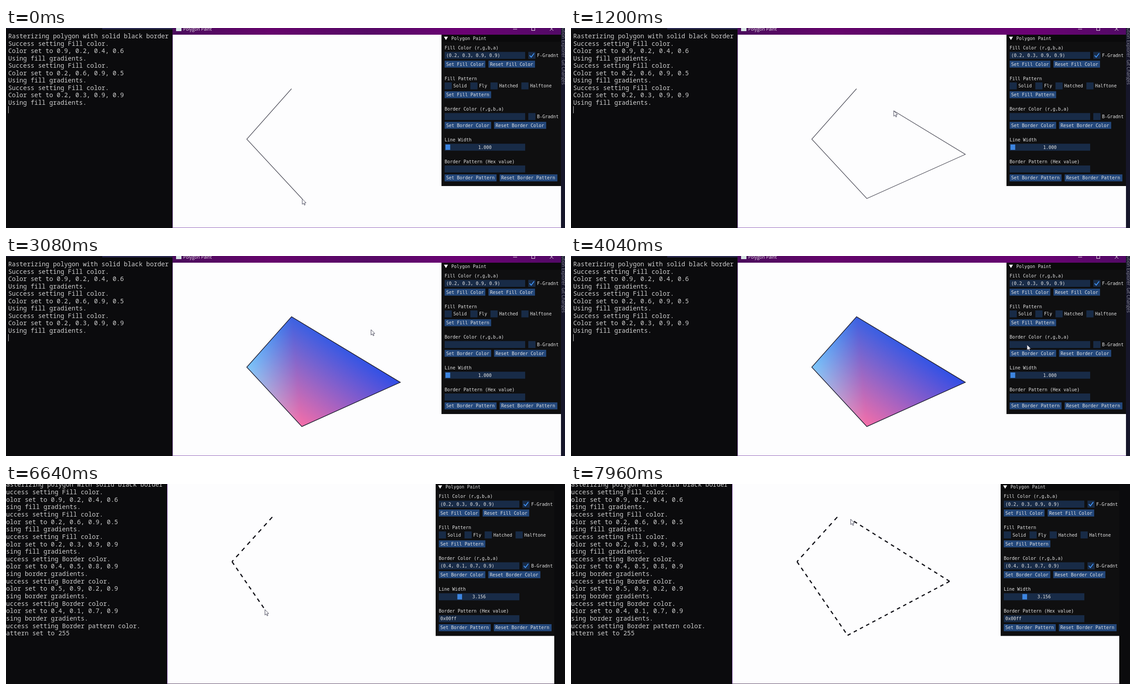
These frames come from a looping animation (1249 by 448 pixels, 8 s). An HTML page with a canvas:

```html
<!DOCTYPE html>
<html>
<head>
<meta charset="utf-8">
<title>Polygon Paint</title>
<style>
html, body { margin: 0; width: 100%; height: 100%; overflow: hidden; background: #0c0c0c; }
canvas { display: block; }
</style>
</head>
<body>
<canvas id="stage" width="1249" height="448"></canvas>
<script>
const ctx = document.getElementById('stage').getContext('2d');
const LOOP = 8000, CUT = 6320;
const MONO = '"DejaVu Sans Mono", monospace';
const TERM = '"Noto Sans Mono", "DejaVu Sans Mono", monospace';
const SANS = '"Open Sans", sans-serif';

// time, x, y of the pointer
const PATH_A = [[0, 662, 383], [110, 661, 382], [540, 881, 283], [640, 881, 283], [840, 845, 257],
  [1480, 637, 137], [2160, 636, 135], [2640, 636, 135], [3560, 1019, 199], [4300, 1019, 199],
  [4500, 1018, 193], [CUT, 1018, 193]];
const PATH_B = [[CUT, 505, 174], [6400, 505, 174], [6800, 618, 339], [6880, 618, 339],
  [7260, 846, 218], [7340, 846, 218], [7960, 625, 79], [LOOP, 620, 77]];
const POLY_A = [[638, 136], [538, 249], [661, 382], [881, 283]];
const POLY_B = [[595, 74], [505, 174], [618, 339], [846, 218]];
const FILLED = 2520;

const colorLog = (kind, rgba) => [`Success setting ${kind} color.`, `Color set to ${rgba}`,
  `Using ${kind.toLowerCase()} gradients.`];
const LOG_A = ['Rasterizing polygon with solid black border',
  ...colorLog('Fill', '0.9, 0.2, 0.4, 0.6'),
  ...colorLog('Fill', '0.2, 0.6, 0.9, 0.5'),
  ...colorLog('Fill', '0.2, 0.3, 0.9, 0.9')];
const LOG_B = [...LOG_A,
  ...colorLog('Border', '0.4, 0.5, 0.8, 0.9'),
  ...colorLog('Border', '0.5, 0.9, 0.2, 0.9'),
  ...colorLog('Border', '0.4, 0.1, 0.7, 0.9'),
  'Success setting Border pattern color.', 'Pattern set to 255'];

function rect(x, y, w, h, color) {
  ctx.fillStyle = color;
  ctx.fillRect(x, y, w, h);
}

function text(s, x, y, font, color, align = 'left') {
  ctx.font = font;
  ctx.fillStyle = color;
  ctx.textAlign = align;
  ctx.textBaseline = 'alphabetic';
  ctx.fillText(s, x, y);
}

function line(points, color, width) {
  ctx.strokeStyle = color;
  ctx.lineWidth = width;
  ctx.beginPath();
  points.forEach(p => ctx.lineTo(...p));
  ctx.stroke();
}

function pointerAt(path, t) {
  const i = Math.max(1, path.findIndex(k => k[0] > t));
  const [t0, x0, y0] = path[i - 1], [t1, x1, y1] = path[i];
  const u = (t - t0) / (t1 - t0), e = u * u * (3 - 2 * u);
  return [x0 + (x1 - x0) * e, y0 + (y1 - y0) * e];
}

function drawPointer([x, y]) {
  ctx.save();
  ctx.translate(x, y);
  ctx.beginPath();
  [[0, 0], [0, 12], [2.8, 9.6], [4.8, 13.8], [6.6, 13], [4.8, 9], [8.4, 8.6]].forEach(p => ctx.lineTo(...p));
  ctx.closePath();
  ctx.fillStyle = '#fff';
  ctx.fill();
  ctx.strokeStyle = '#3c3c50';
  ctx.lineWidth = 1;
  ctx.stroke();
  ctx.restore();
}

function drawLog(lines, x, y, step) {
  lines.forEach((s, i) => text(s, x, y + i * step + 4.5, '13.9px ' + TERM, '#cfcfcf'));
}

// Smooth colour blend across a triangle: one fading layer per corner, summed.
function shadeTriangle(g, pts, colors) {
  g.globalCompositeOperation = 'lighter';
  pts.forEach(([x, y], i) => {
    const [bx, by] = pts[(i + 1) % 3], [cx, cy] = pts[(i + 2) % 3];
    const dx = cx - bx, dy = cy - by;
    const k = ((x - bx) * dx + (y - by) * dy) / (dx * dx + dy * dy);
    const fade = g.createLinearGradient(x, y, bx + k * dx, by + k * dy);
    fade.addColorStop(0, colors[i]);
    fade.addColorStop(1, '#000');
    g.fillStyle = fade;
    g.beginPath();
    pts.forEach(p => g.lineTo(...p));
    g.fill();
  });
}

const fill = document.createElement('canvas');
fill.width = 1249;
fill.height = 448;
{
  const [a, b, c, d] = POLY_A, g = fill.getContext('2d');
  const blue = '#3b62e2', cyan = '#7cc8fb', pink = '#f56ea8', deep = '#304de6';
  shadeTriangle(g, [a, b, c], [blue, cyan, pink]);
  shadeTriangle(g, [a, c, d], [blue, pink, deep]);
}

function frame(x, y, w = 180) { rect(x, y - 7.8, w, 15.6, '#182b47'); }

function label(s, x, y, align) { text(s, x, y + 3.5, '10px ' + MONO, '#e4e4e4', align); }

function button(s, x, y, w) {
  rect(x, y - 7.8, w, 15.6, '#23477a');
  label(s, x + 3.5, y);
}

function checkbox(s, x, y, on) {
  frame(x, y, 16);
  if (on) line([[x + 3, y], [x + 6.5, y + 4], [x + 13, y - 4.5]], '#4296fa', 1.8);
  label(s, x + 19.5, y);
}

function drawPanel(p) {
  rect(973, 15, 267, 339, '#0f0f10');
  rect(973, 15, 267, 16, p.focus ? '#24426e' : '#0a0a0b');
  ctx.fillStyle = '#fff';
  ctx.beginPath();
  [[978.5, 19.5], [987.5, 19.5], [983, 27]].forEach(q => ctx.lineTo(...q));
  ctx.fill();
  label('Polygon Paint', 995, 23);

  label('Fill Color (r,g,b,a)', 980, 44);
  frame(980, 61.3);
  label('(0.2, 0.3, 0.9, 0.9)', 983.5, 61.3);
  checkbox('F-Gradnt', 1167, 61.3, true);
  button('Set Fill Color', 980, 81, 91);
  button('Reset Fill Color', 1078, 81, 104);

  label('Fill Pattern', 980, 113);
  [['Solid', 980], ['Fly', 1037.5], ['Hatched', 1082.5], ['Halftone', 1151.5]]
    .forEach(([s, x]) => checkbox(s, x, 129.7));
  button('Set Fill Pattern', 980, 149.5, 104);

  label('Border Color (r,g,b,a)', 980, 181.5);
  frame(980, 198.3);
  label(p.border, 983.5, 198.3);
  if (p.caret) rect(984 + p.border.length * 6.02, 192.5, 1, 11, '#fff');
  checkbox('B-Gradnt', 1167, 198.3, p.gradient);
  button('Set Border Color', 980, 218, 104);
  button('Reset Border Color', 1090.5, 218, 116.5);

  label('Line Width', 980, 250.3);
  frame(980, 267);
  rect(p.grab, 261, 10.5, 12, '#3d85e0');
  label(p.width, 1070, 267, 'center');

  label('Border Pattern (Hex value)', 980, 299);
  frame(980, 315.8);
  label(p.hex, 983.5, 315.8);
  button('Set Border Pattern', 980, 335.7, 116);
  button('Reset Border Pattern', 1103, 335.7, 129);
}

function drawTitleBar() {
  const g = ctx.createLinearGradient(372, 0, 1240, 0);
  ['#4a0c5c', '#66046c', '#560a66', '#6c0274', '#520a66'].forEach((c, i) => g.addColorStop(i / 4, c));
  rect(372, 0, 868, 15, g);
  rect(380, 0, 12, 7, '#d8e6e4');
  text('Polygon Paint', 396, 6, '10px ' + SANS, '#eee');
  line([[1133, 2.5], [1142, 2.5]], '#eee', 1);
  ctx.strokeRect(1174.5, -2.5, 7, 8);
  line([[1215, -2], [1223, 6]], '#eee', 1);
  line([[1223, -2], [1215, 6]], '#eee', 1);
}

function drawSideStrip() {
  rect(1240, 0, 9, 448, '#16162a');
  ctx.save();
  ctx.translate(1242, 0);
  ctx.rotate(Math.PI / 2);
  text('ution Explorer', 0, 0, '10px ' + SANS, '#8e8e9c');
  text('Git Changes', 71, 0, '10px ' + SANS, '#8e8e9c');
  ctx.restore();
}

function sceneA(t) {
  rect(0, 0, 215, 2, '#18182a');
  rect(215, 0, 157, 3, '#2a2a50');
  drawLog(LOG_A, 5, 18.7, 16.5);
  rect(5, 175, 1, 16, '#ccc');
  rect(372, 0, 868, 448, '#fdfdfe');
  drawTitleBar();
  rect(372, 15, 1, 433, '#a070c8');
  rect(372, 447, 868, 1, '#8a5ab4');
  drawSideStrip();

  const tip = pointerAt(PATH_A, t);
  if (t < FILLED) {
    const placed = t < 110 ? 2 : t < 580 ? 3 : 4;
    line([...POLY_A.slice(0, placed), tip], '#4c4c58', 1.3);
  } else {
    ctx.drawImage(fill, 0, 0);
    line([...POLY_A, POLY_A[0], POLY_A[1]], '#26263a', 1.6);
  }

  const typed = Math.max(0, Math.floor((t - 4440) / 260));
  drawPanel({
    focus: t >= 4360, border: '(0.4, 0.5, 0.8, 0.9)'.slice(0, typed),
    caret: t >= 4360, grab: 982, width: '1.000', hex: ''
  });
  drawPointer(tip);
}

function sceneB(t) {
  drawLog(LOG_B, -8, 1.8, 16.65);
  rect(360, 0, 865, 447, '#fdfdfe');
  rect(360, 0, 1, 448, '#a070c8');
  rect(360, 447, 865, 1, '#55405f');

  const tip = pointerAt(PATH_B, t);
  const placed = t < 6400 ? 1 : t < 6840 ? 2 : t < 7330 ? 3 : 4;
  const pts = [...POLY_B.slice(0, placed), tip];
  // Dashes are measured along the longer axis of each edge.
  for (let i = 1; i < pts.length; i++) {
    const dx = pts[i][0] - pts[i - 1][0], dy = pts[i][1] - pts[i - 1][1];
    const major = Math.max(Math.abs(dx), Math.abs(dy));
    if (!major) continue;
    const dash = 6.9 * Math.hypot(dx, dy) / major;
    ctx.setLineDash([dash, dash]);
    line([pts[i - 1], pts[i]], '#111118', 2.6);
  }
  ctx.setLineDash([]);

  ctx.save();
  ctx.beginPath();
  ctx.rect(360, 0, 865, 448);
  ctx.clip();
  ctx.translate(-13, 6.5 - 23 * 1.0085);
  ctx.scale(1, 1.0085);
  drawPanel({
    border: '(0.4, 0.1, 0.7, 0.9)', gradient: true,
    grab: 1021.5, width: '3.156', hex: '0x00ff'
  });
  ctx.restore();
  drawPointer(tip);
}

const start = performance.now();
function draw() {
  const t = Math.max(0, performance.now() - start) % LOOP;
  rect(0, 0, 1249, 448, '#0b0b0d');
  (t < CUT ? sceneA : sceneB)(t);
  requestAnimationFrame(draw);
}
draw();
</script>
</body>
</html>
```
